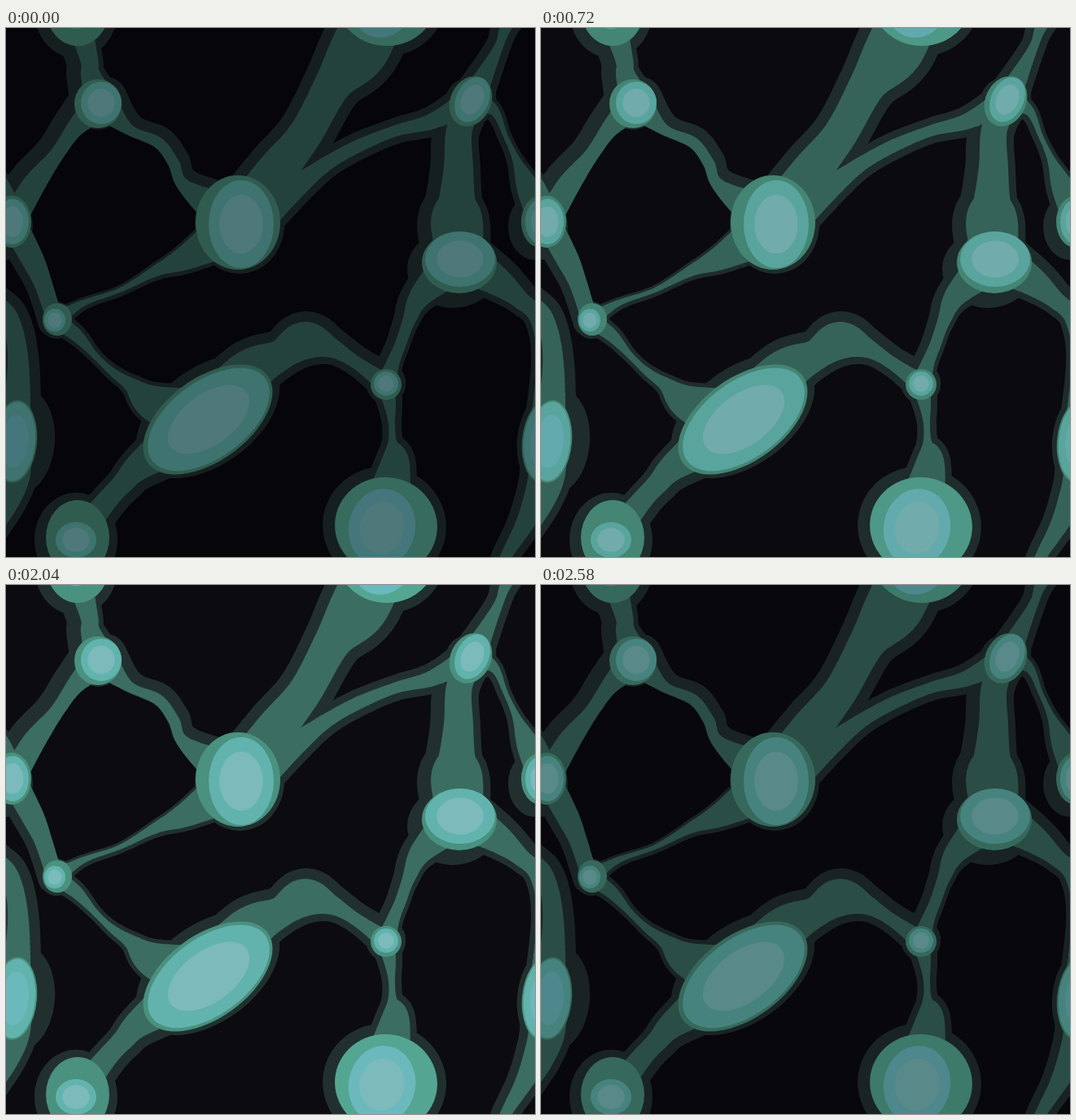
These frames come from a looping animation (650x650 px, 2700 ms). An HTML page with a canvas:

```html
<!DOCTYPE html>
<html lang="en">
<head>
<meta charset="utf-8">
<title>Glowing cell network</title>
<style>
  html, body { margin: 0; width: 100%; height: 100%; overflow: hidden; background: #06050a; }
  canvas { display: block; width: 650px; height: 650px; }
</style>
</head>
<body>
<canvas id="stage" width="650" height="650"></canvas>
<script>
const SIZE = 650;
const LOOP = 2700;
const CORE_SCALE = 0.67;
const ROOT_SCALE = 0.8;
const STEPS = 18;
const ctx = document.getElementById('stage').getContext('2d');

// Each tone fades between its dim and its bright colour.
const TONES = {
  ground: [[6, 5, 10], [14, 13, 18]],
  halo: [[22, 31, 32], [36, 53, 51]],
  web: [[36, 66, 60], [65, 121, 106]],
  moss: [[48, 92, 79], [81, 160, 141]],
  leaf: [[54, 107, 93], [92, 182, 162]],
  teal: [[62, 115, 111], [108, 197, 190]],
  blue: [[68, 118, 124], [119, 204, 207]],
  core: [[78, 120, 122], [137, 205, 205]]
};

// Shapes are gathered per tone, in painting order.
const layers = { halo: [], web: [], moss: [], leaf: [], teal: [], blue: [], core: [] };

function addOval(name, x, y, rx, ry, turn) {
  const path = new Path2D();
  path.ellipse(x, y, rx, ry, turn * Math.PI / 180, 0, 2 * Math.PI);
  layers[name].push(path);
}

// rim: shift and growth of the outer ring; glow: shift and growth of the halo around it.
function cell(x, y, rx, ry, turn, rim, glow, [outer, body, heart] = ['moss', 'teal', 'core']) {
  const [dx, dy, growX, growY] = rim;
  const [glowX, glowY, spread] = glow;
  const [cx, cy, wide, high] = [x + dx, y + dy, rx + growX, ry + growY];
  addOval('halo', cx + glowX, cy + glowY, wide + spread, high + spread, turn);
  addOval(outer, cx, cy, wide, high, turn);
  addOval(body, x, y, rx, ry, turn);
  addOval(heart, x, y, rx * CORE_SCALE, ry * CORE_SCALE, turn);
  return { x, y, root: Math.min(rx, ry) * ROOT_SCALE };
}

const shifted = (c, dx, dy) => ({ ...c, x: c.x + dx, y: c.y + dy });

function spline(a, b, c, d, t) {
  return b + t / 2 * (c - a + t * (2 * a - 5 * b + 4 * c - d + t * (3 * (b - c) + d - a)));
}

// A strand sweeps a disc through stations of [x, y, radius] from cell to cell.
// Its halo is the same sweep, wider by spread and leaning to one side.
function strand(from, to, [leanX, leanY, spread], ...stations) {
  const ends = [from, to].map(c => [c.x, c.y, c.root]);
  const line = [ends[0], ...stations, ends[1]];
  const at = i => line[Math.max(0, Math.min(line.length - 1, i))];
  const web = new Path2D();
  const halo = new Path2D();
  const disc = (path, x, y, r) => {
    path.moveTo(x + r, y);
    path.arc(x, y, r, 0, 2 * Math.PI);
  };
  for (let i = 0; i < line.length - 1; i++) {
    for (let s = 0; s <= STEPS; s++) {
      const [x, y, r] = [0, 1, 2].map(k =>
        spline(at(i - 1)[k], at(i)[k], at(i + 1)[k], at(i + 2)[k], s / STEPS));
      disc(web, x, y, Math.max(2, r));
      disc(halo, x + leanX, y + leanY, Math.max(2, r) + spread);
    }
  }
  layers.web.push(web);
  layers.halo.push(halo);
}

const southWest = cell(86, 629, 25, 22, 0, [2, -3, 14, 24], [-2, 3, 12]);
const northWest = cell(117, 92, 25, 26, 0, [-4, 1, 4, 4], [0, 0, 2]);
const west = cell(8, 238, 20, 28, 0, [-1, 0, 4, 4], [-7, 6, 9]);
const middle = cell(289, 241, 40, 54, 0, [-4, -2, 12, 4], [2, 2, 3]);
const bead = cell(60, 359, 13, 14, 0, [3, -1, 5, 6], [-1, 1, 3]);
const long = cell(249, 481, 86, 47, -36, [-1, 0, 5, 4], [0, -4, 9]);
const knot = cell(467, 437, 15, 15, 0, [0, 1, 4, 4], [0, 0, 5]);
const south = cell(462, 614, 41, 48, 10, [5, -2, 22, 12], [-2, 0, 13], ['leaf', 'blue', 'core']);
const northEast = cell(573, 88, 20, 29, 25, [-2, 2, 5, 3], [2, 0, 3]);
const east = cell(558, 284, 43, 34, 0, [-1, 4, 3, 4], [-8, 8, 10]);
const edge = cell(11, 508, 25, 49, 5, [0, 0, 2, 2], [8, 0, 14], ['moss', 'teal', 'blue']);

strand(shifted(southWest, 0, -SIZE), northWest, [-6, 0, 12], [102, 38, 11], [104, 58, 12]);
strand(northWest, west, [-8, -5, 9], [86, 122, 11], [62, 156, 9], [34, 193, 14]);
strand(northWest, middle, [5, -5, 7], [150, 124, 7], [187, 141, 7], [206, 166, 7], [221, 196, 9]);
strand(west, bead, [-5, 3, 5], [32, 283, 14], [46, 315, 11]);
strand(bead, middle, [0, 1, 4], [95, 338, 4], [140, 322, 3], [185, 298, 7], [225, 280, 16]);
strand(bead, long, [0, 0, 5], [86, 377, 8], [110, 403, 4], [130, 422, 5], [154, 439, 9], [183, 462, 22]);
strand(southWest, long, [1, 2, 10], [122, 583, 13], [144, 559, 13], [168, 535, 18]);
strand(long, knot, [1, -2, 11], [298, 424, 28], [337, 402, 19], [367, 384, 23], [400, 393, 12], [430, 411, 8]);
strand(knot, south, [0, 0, 8], [472, 465, 7], [474, 488, 4], [475, 511, 6], [478, 537, 18]);
strand(knot, east, [-4, 2, 8], [476, 410, 8], [485, 388, 7], [495, 360, 8], [511, 327, 14]);
strand(east, northEast, [-4, 2, 13], [554, 240, 32], [554, 215, 23], [556, 170, 18], [557, 125, 16]);
strand(northEast, middle, [0, 0, 9], [525, 114, 10], [480, 126, 7], [435, 144, 8], [395, 166, 9], [358, 193, 14]);
strand(shifted(south, 0, -SIZE), middle, [0, 0, 14], [435, 25, 36], [402, 69, 23], [368, 130, 21], [331, 178, 25]);
strand(northEast, shifted(west, SIZE, 0), [-1, 1, 6], [600, 102, 6], [614, 133, 3], [627, 162, 5], [642, 198, 14]);
strand(east, shifted(edge, SIZE, 0), [3, -1, 10], [602, 310, 18], [632, 334, 11], [655, 358, 11], [665, 412, 13]);
strand(shifted(edge, SIZE, 0), shifted(northEast, 0, SIZE), [-1, 0, 10],
  [661, 547, 19], [652, 578, 16], [636, 612, 11], [614, 650, 7], [604, 676, 6]);

// Stepped pulse: brighten, hold, then fade a little faster.
function glowAt(time) {
  if (time < 1200) return Math.floor(time / 240) * 0.2;
  if (time < 2040) return 1;
  return 0.78 - Math.floor((time - 2040) / 180) * 0.195;
}

function tone(name, glow) {
  const [dim, bright] = TONES[name];
  return `rgb(${dim.map((v, i) => Math.round(v + (bright[i] - v) * glow)).join(',')})`;
}

// The pattern tiles, so parts that cross an edge return on the other side.
const TILES = [[0, 0], [SIZE, 0], [-SIZE, 0], [0, -SIZE]];

function draw(glow) {
  ctx.setTransform(1, 0, 0, 1, 0, 0);
  ctx.fillStyle = tone('ground', glow);
  ctx.fillRect(0, 0, SIZE, SIZE);
  for (const [name, shapes] of Object.entries(layers)) {
    ctx.fillStyle = tone(name, glow);
    for (const [dx, dy] of TILES) {
      ctx.setTransform(1, 0, 0, 1, dx, dy);
      for (const shape of shapes) ctx.fill(shape);
    }
  }
}

const start = performance.now();
let shown = -1;
function tick() {
  const glow = glowAt((performance.now() - start) % LOOP);
  if (glow !== shown) draw(shown = glow);
  requestAnimationFrame(tick);
}
tick();
</script>
</body>
</html>
```
